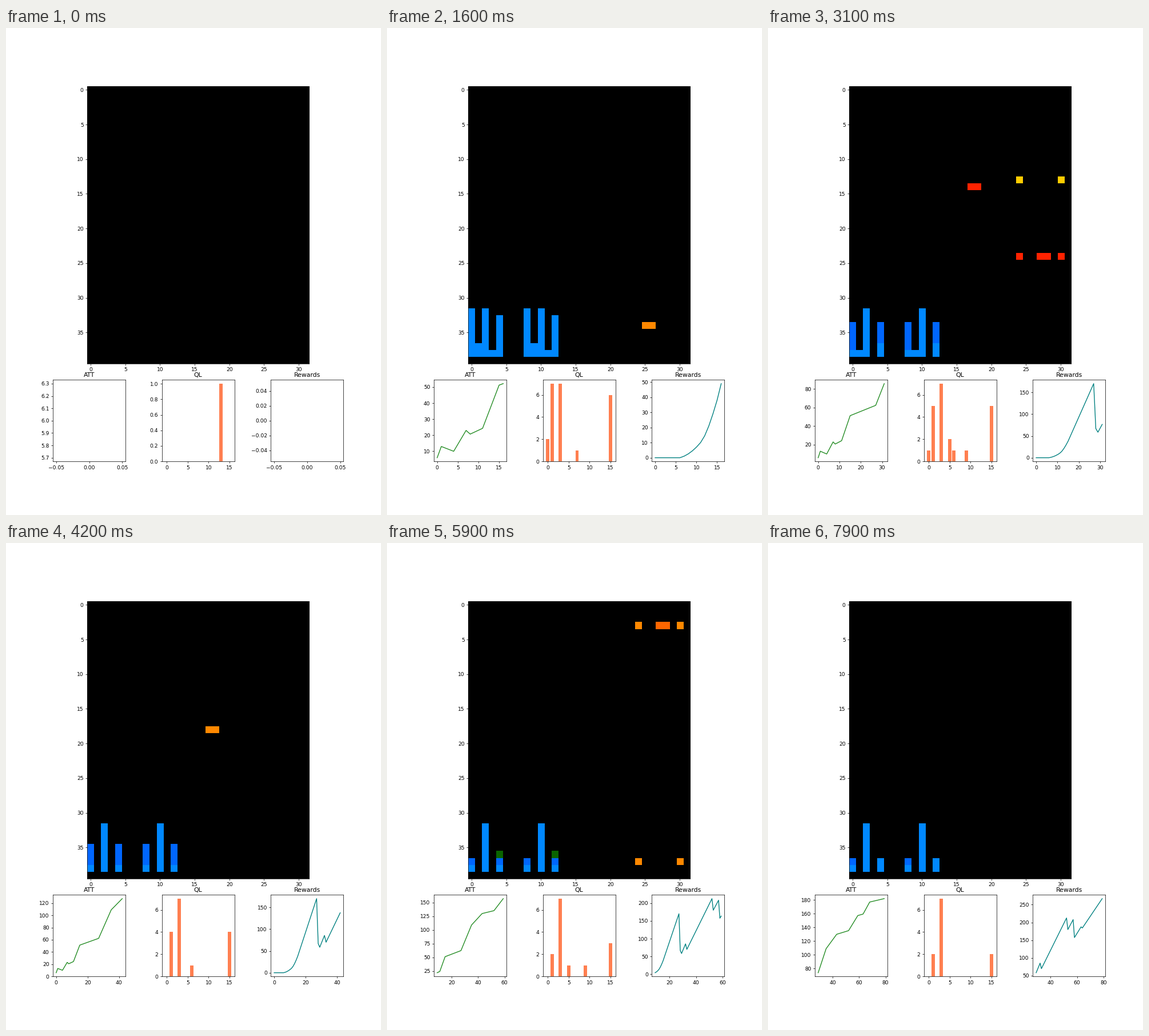
Animation, 656 px wide and 853 px high, one loop 8000 ms. Source, as a matplotlib script:

```python
import matplotlib.pyplot as plt
import numpy as np
from matplotlib.animation import FuncAnimation

STEPS, WINDOW = 80, 51
HUES = {"o": "#ff8800", "d": "#ff6600", "y": "#ffcc00", "r": "#ff2200",
        "b": "#0088ff", "n": "#0066ff", "g": "#0a6400"}
RGB = {k: [int(h[i:i + 2], 16) for i in (1, 3, 5)] for k, h in HUES.items()}
EXIT_COLS = {5: [24, 30], 6: [17, 18], 7: [25, 26], 9: [27, 28]}

# Average travel time, linear between key points
ATT = {0: 6, 1: 13, 4: 10, 7: 23, 8: 20.7, 11: 24.3, 15: 51.2, 27: 62.3,
       35: 109, 43: 130, 52: 135.3, 59: 157.3, 63: 159.5, 68: 177, 79: 182}


class Queue:
    """Cars waiting in one column; each car is [wait, moves], front first."""

    def __init__(self, col, lane, size, first, out=None, releases=(), late=()):
        self.cols, self.lane, self.out = [col, col + 8], lane, out
        self.releases, self.late = releases, late
        self.arrivals = np.linspace(first, 16, size).round().astype(int)
        self.cars = []

    def step(self, n):
        for car in self.cars:
            car[0] += 1
        for _ in range(self.releases.count(n)):
            self.cars = [[0, moves + 1] for _, moves in self.cars[1:]]
        joining = np.sum(self.arrivals == n) + self.late.count(n)
        self.cars += [[1, 0] for _ in range(joining)]

    def draw(self, grid, n):
        """Paint the column and return how many cars are in its lane."""
        for pos, (_, moves) in enumerate(self.cars):
            hue = "b"
            if moves == 0 and self.cars[0][1]:
                hue = "g"  # joined a queue that was already moving
            elif moves and pos and pos + moves > 2:
                hue = "n"  # crept forward
            grid[38 - pos, self.cols] = RGB[hue]
        coming = [t - n for t in self.arrivals if 0 < t - n <= 3]
        for left in coming:
            grid[30 - 10 * left, self.cols] = RGB["yro"[left - 1]]
        return len(self.cars) + len(coming)


def simulate():
    queues = [
        Queue(0, 1, 7, 7, 5, (28, 29, 33, 58, 58)),
        Queue(1, 0, 2, 13, 6, (29, 33)),
        Queue(2, 3, 7, 12),
        Queue(3, None, 1, 15, None, (28,)),
        Queue(4, 15, 6, 7, 9, (28, 33, 53, 58, 64), (59,)),
    ]
    # Outgoing cars: first step, lane, rows per step
    cars = [(t + 1, q.out, 11 if q.out == 6 else 10.5)
            for q in queues if q.out for t in q.releases]
    cars += [(t, (5, 6, 9)[t % 3], 10.5) for t in range(2, 12, 2)]
    cars += [(13, 7, 10.5), (39, 6, 5), (56, 5, 11.4)]

    states = []
    for n in range(STEPS):
        grid = np.zeros((40, 32, 3), np.uint8)
        lanes = np.zeros(16, int)
        wait = 0
        for q in queues:
            q.step(n)
            count = q.draw(grid, n)
            if q.lane is not None:
                lanes[q.lane] = count
                wait += sum(car[0] for car in q.cars)
        cells = {(lane, int(3 + speed * (n - t)), n - t)
                 for t, lane, speed in cars if 0 <= n - t < 4}
        for lane, row, k in cells:
            hues = "oyro" if lane == 5 else "drro"
            grid[row, EXIT_COLS[lane]] = RGB[hues[k]]
            lanes[lane] += row < 37
        lanes[13] = n < 2
        states.append((grid, lanes, wait / 2))
    return states


states = simulate()
steps = np.arange(STEPS)
att = np.interp(steps, list(ATT), list(ATT.values()))
reward = np.array([s[2] for s in states])

# 656 x 853 px
fig = plt.figure(figsize=(10, 13.0031), dpi=65.6)
gs = fig.add_gridspec(4, 3, left=0.125, right=0.9, bottom=0.11, top=0.88,
                      wspace=0.5, hspace=0.2)
road = fig.add_subplot(gs[:3, :])
ax_att, ax_ql, ax_rew = (fig.add_subplot(gs[3, i]) for i in range(3))
image = road.imshow(states[0][0])


def draw(n):
    grid, lanes, _ = states[n]
    image.set_data(grid)
    for ax, title in ((ax_att, "ATT"), (ax_ql, "QL"), (ax_rew, "Rewards")):
        ax.clear()
        ax.set_title(title)
    span = slice(max(0, n + 1 - WINDOW), n + 1)
    ax_att.plot(steps[span], att[span], color="forestgreen")
    ax_ql.bar(range(16), lanes, color="coral")
    ax_rew.plot(steps[span], reward[span], color="teal")
    return []


anim = FuncAnimation(fig, draw, frames=STEPS, interval=100, repeat=True,
                     init_func=lambda: [])
plt.show()
```
